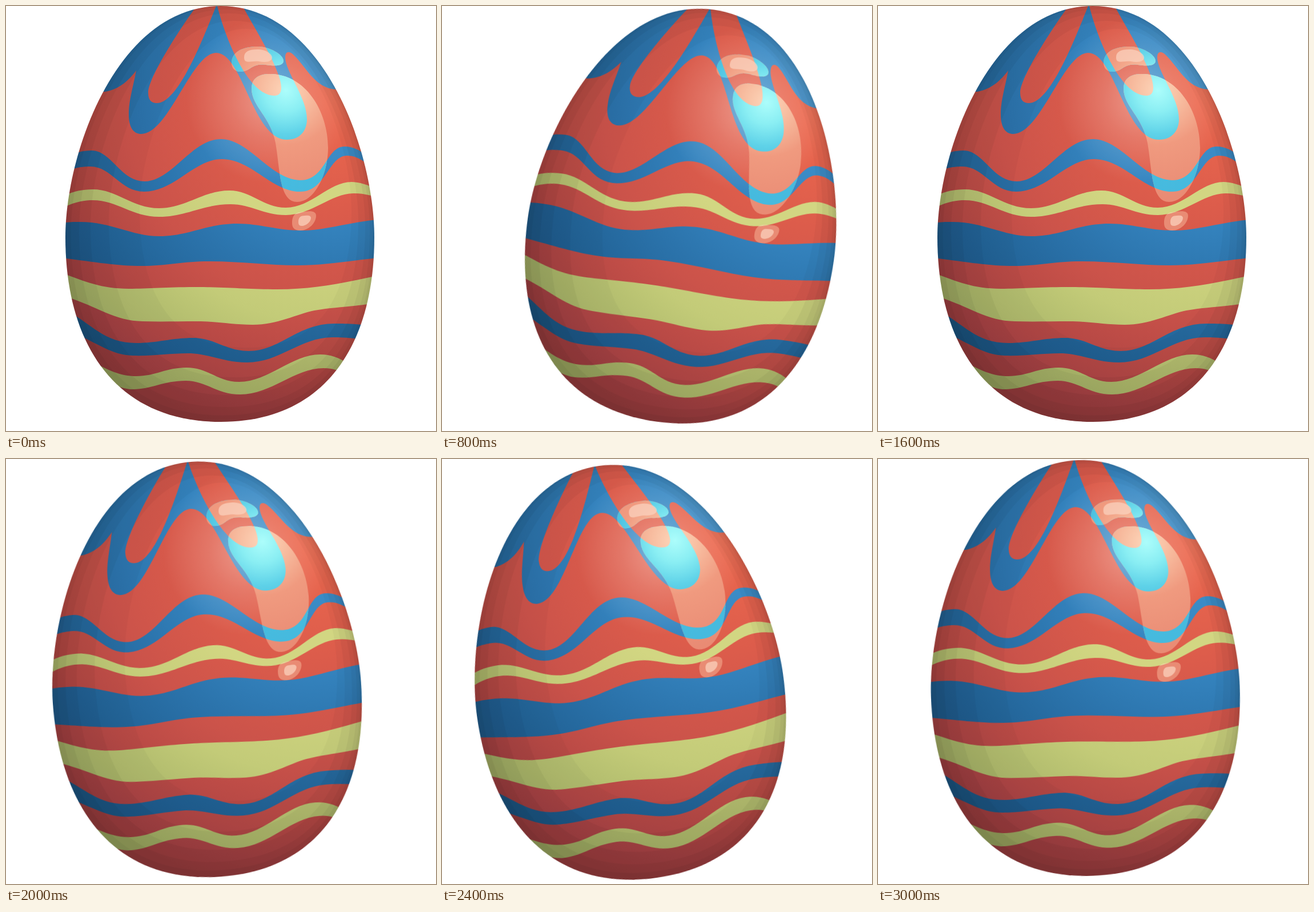
Recreate the animation shown at these times as an HTML page without scripts. Size 753 by 744 pixels, loop 3.2 s.

```html
<!DOCTYPE html>
<html lang="en">
<head>
<meta charset="utf-8">
<title>Rocking egg</title>
<style>
html, body { margin: 0; width: 100%; height: 100%; overflow: hidden; background: #fff; }
svg { display: block; width: 753px; height: 744px; }

.r { fill: var(--r); }
.b { fill: var(--b); }
.y { fill: var(--y); }
.paint { --r: url(#red); --b: url(#blue); --y: url(#lime); }
.shine { --r: url(#peach); --b: url(#cyan); --y: #e2e09c; }
.rings use { fill: none; stroke: #000; stroke-opacity: .045; }

/* 2 degrees per step, out and back on each side */
.rock { transform-origin: 376px 364px; animation: rock 3.2s step-end infinite; }
@keyframes rock {
  0%, 50%, 100% { transform: none; }
  6.25%, 43.75% { transform: translate(12.4px, .5px) rotate(2deg); }
  12.5%, 37.5% { transform: translate(24.8px, 1.2px) rotate(4deg); }
  18.75%, 31.25% { transform: translate(37.2px, 2px) rotate(6deg); }
  25% { transform: translate(49.5px, 3px) rotate(8deg); }
  56.25%, 93.75% { transform: translate(-12.8px, 1.8px) rotate(-2deg); }
  62.5%, 87.5% { transform: translate(-25.5px, 4px) rotate(-4deg); }
  68.75%, 81.25% { transform: translate(-38.2px, 6.1px) rotate(-6deg); }
  75% { transform: translate(-51px, 8.6px) rotate(-8deg); }
}
</style>
</head>
<body>
<svg viewBox="0 0 753 744" xmlns="http://www.w3.org/2000/svg">
<defs>
  <radialGradient id="red" gradientUnits="userSpaceOnUse" cx="580" cy="150" r="620">
    <stop offset="0" stop-color="#ee6a4f"/>
    <stop offset=".33" stop-color="#dc5c4b"/>
    <stop offset=".6" stop-color="#cb534a"/>
    <stop offset=".78" stop-color="#b84945"/>
    <stop offset=".92" stop-color="#a44143"/>
    <stop offset="1" stop-color="#993c3e"/>
  </radialGradient>
  <radialGradient id="blue" gradientUnits="userSpaceOnUse" cx="580" cy="150" r="620">
    <stop offset="0" stop-color="#4092cc"/>
    <stop offset=".36" stop-color="#3584bf"/>
    <stop offset=".56" stop-color="#2b73ab"/>
    <stop offset=".8" stop-color="#206093"/>
    <stop offset="1" stop-color="#1a527f"/>
  </radialGradient>
  <radialGradient id="lime" gradientUnits="userSpaceOnUse" cx="580" cy="150" r="620">
    <stop offset=".4" stop-color="#d2d682"/>
    <stop offset=".66" stop-color="#c3cb78"/>
    <stop offset=".9" stop-color="#a7b367"/>
    <stop offset="1" stop-color="#9aa65f"/>
  </radialGradient>
  <radialGradient id="peach" gradientUnits="userSpaceOnUse" cx="490" cy="148" r="190">
    <stop offset="0" stop-color="#fdd6ba"/>
    <stop offset=".2" stop-color="#f8bfa2"/>
    <stop offset=".5" stop-color="#f09a7f"/>
    <stop offset="1" stop-color="#e98b74"/>
  </radialGradient>
  <radialGradient id="cyan" gradientUnits="userSpaceOnUse" cx="490" cy="148" r="190">
    <stop offset="0" stop-color="#acfdfb"/>
    <stop offset=".2" stop-color="#8aeef3"/>
    <stop offset=".4" stop-color="#5fd2e8"/>
    <stop offset=".6" stop-color="#48bddf"/>
    <stop offset="1" stop-color="#45b9de"/>
  </radialGradient>
  <radialGradient id="glow" gradientUnits="userSpaceOnUse" cx="460" cy="165" r="145">
    <stop offset="0" stop-color="#fff" stop-opacity=".34"/>
    <stop offset=".45" stop-color="#fff" stop-opacity=".16"/>
    <stop offset="1" stop-color="#fff" stop-opacity="0"/>
  </radialGradient>

  <path id="egg" d="M376 0C556 0 645 255 645 405C645 590 561 728 376 728C190 728 104 590 104 405C104 255 196 0 376 0Z"/>
  <clipPath id="shell"><use href="#egg"/></clipPath>
  <clipPath id="gloss">
    <path d="M430 145C430 127 442 119 462 119C525 119 564 185 564 248C564 295 540 343 510 343C478 343 480 285 472 240C464 195 430 175 430 145Z"/>
    <path d="M395 100C395 80 415 71 440 71C462 71 486 85 486 96C486 104 475 106 455 103C430 100 428 115 410 115C400 115 395 108 395 100Z"/>
    <path d="M501 380C501 365 508 360 522 360C536 358 543 360 543 367C543 380 530 393 515 393C505 393 501 388 501 380Z"/>
  </clipPath>

  <g id="art">
    <path class="r" d="M60-20H700V760H60Z"/>
    <path class="b" d="M60-20V150H174C200 145 215 130 228 113C222 145 215 165 215 190C215 215 225 224 237 224C285 224 325 82 368 82C415 82 432 234 492 234C515 234 527 218 527 198C527 160 489 115 489 90C489 80 495 78 503 85C525 105 540 144 578 146H700V-20Z"/>
    <path class="r" d="M340-10L328 8C305 40 249 125 249 152C249 165 255 170 264 170C300 170 340 70 368 0V-10Z"/>
    <path class="r" d="M370 0C385 60 425 157 470 157C478 157 482 152 482 143C482 115 445 55 417 5L409-10H370Z"/>
    <path class="b" d="M100 275C115 258 130 253 150 253C185 253 200 307 243 307C290 307 325 233 377 233C425 233 465 305 515 305C560 305 560 246 593 246C610 246 622 254 640 268V282C622 268 612 262 597 262C565 262 560 325 515 325C465 325 430 268 378 268C330 268 295 325 242 325C200 325 185 281 148 281C135 281 125 282 100 290Z"/>
    <path class="y" d="M95 336C112 326 130 321 152 321C195 321 220 354 268 354C315 354 345 323 391 323C430 323 450 353 490 353C535 353 565 308 605 308C620 308 635 314 655 322V338C640 331 625 328 608 328C570 328 535 366 490 366C450 366 430 347 393 347C345 347 315 369 268 369C220 369 195 340 152 340C135 340 120 343 95 355Z"/>
    <path class="b" d="M90 381C105 378 118 378 130 378C185 378 220 403 268 403C320 403 350 381 405 381C445 381 475 393 518 393C560 393 600 378 660 373V440C600 446 560 454 510 454C460 454 410 447 355 447C310 447 280 455 238 455C190 455 150 447 90 440Z"/>
    <path class="y" d="M90 465C130 478 160 495 215 495C250 495 280 492 330 492C390 492 420 496 475 496C540 496 590 485 660 470V518C600 528 580 526 540 533C510 539 475 558 432 558C395 558 370 552 335 552C300 552 270 553 240 552C185 551 160 524 90 504Z"/>
    <path class="b" d="M100 530C150 555 170 590 228 590C265 590 290 581 328 581C365 581 385 604 425 604C480 604 510 556 575 556C595 556 610 556 640 560V586C610 581 590 580 572 580C515 580 480 624 422 624C380 624 355 608 318 608C285 608 260 613 222 612C185 611 160 590 120 573Z"/>
    <path class="y" d="M150 622C180 638 200 648 228 648C262 648 280 633 316 633C355 633 370 658 408 658C460 658 500 610 550 610C570 610 580 615 600 626V650C590 640 575 634 556 634C505 634 465 680 410 680C370 680 350 656 315 656C275 656 255 671 222 671C205 671 195 664 170 660Z"/>
  </g>
</defs>

<g class="rock">
  <g clip-path="url(#shell)">
    <use class="paint" href="#art"/>
    <circle cx="460" cy="165" r="145" fill="url(#glow)"/>
    <g class="rings">
      <use href="#egg" x="3" y="-5" stroke-width="13"/>
      <use href="#egg" x="8" y="-10" stroke-width="32"/>
      <use href="#egg" x="14" y="-17" stroke-width="60"/>
      <use href="#egg" x="24" y="-26" stroke-width="104"/>
      <use href="#egg" x="45" y="-45" stroke-width="170" style="stroke-opacity:.03"/>
    </g>
    <g clip-path="url(#gloss)"><use class="shine" href="#art"/></g>
    <g fill="#fbd3bf" fill-opacity=".72">
      <path d="M417 90C417 80 425 76 440 76C455 76 466 84 466 90C466 98 455 99 443 97C430 95 417 103 417 90Z"/>
      <path d="M512 378C512 370 516 367 523 367C530 366 534 367 534 371C534 378 525 385 518 385C513 385 512 382 512 378Z"/>
    </g>
  </g>
</g>
</svg>
</body>
</html>
```
